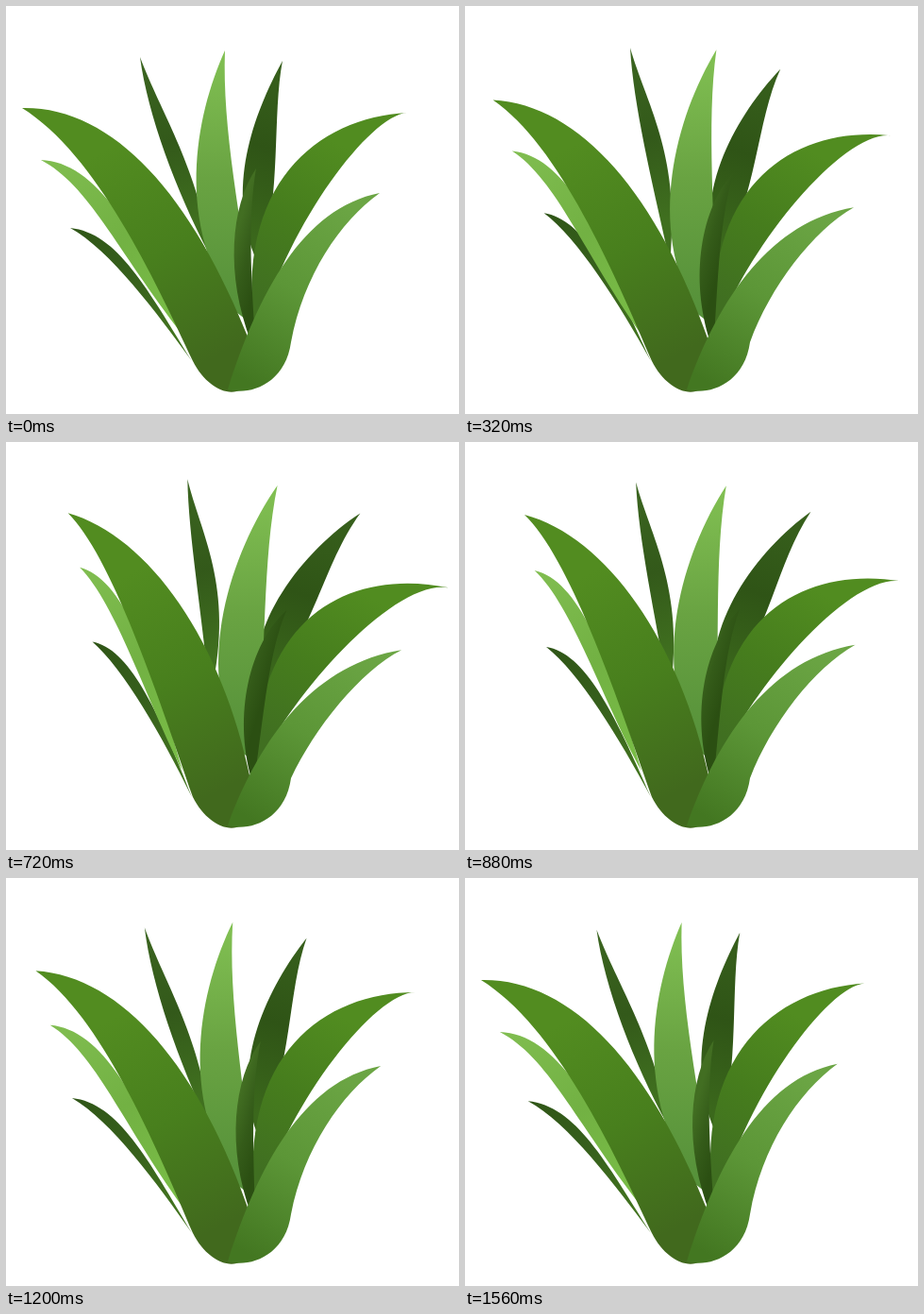
Write an HTML page with a canvas that moves like this. It is 480x432 px and loops after 1600 ms.

```html
<!DOCTYPE html>
<html lang="en">
<head>
<meta charset="utf-8">
<title>Swaying plant</title>
<style>
  html, body { margin: 0; height: 100%; overflow: hidden; background: #fff; }
  canvas { display: block; }
</style>
</head>
<body>
<canvas id="stage" width="480" height="432"></canvas>
<script>
const ctx = document.getElementById('stage').getContext('2d');
const LOOP = 1600, STEP = 40;

// A leaf has two edges running from the tip to fixed ends.
// Poses: tip, two controls of edge one, two controls of edge two.
// foot: optional controls of the curve joining both ends.
// shade: gradient line followed by its colours.
const leaves = [
  { // back left
    peak: 630, ends: [215, 262, 218, 262],
    rest: [142, 54, 150, 115, 180, 195, 165, 115, 198, 160],
    bent: [193, 39, 194, 100, 208, 180, 206, 95, 243, 153],
    shade: [170, 50, 210, 230, '#3b6520', '#33591a', '#40701f']
  },
  { // back right
    peak: 712, ends: [266, 270, 270, 270],
    rest: [293, 58, 262, 115, 232, 195, 282, 115, 292, 200],
    bent: [368, 74, 310, 115, 250, 195, 330, 130, 325, 200],
    shade: [320, 60, 265, 250, '#38611d', '#2f5416', '#3b681c']
  },
  { // low left
    peak: 625, ends: [197, 376, 197, 376],
    rest: [68, 235, 118, 240, 150, 300, 110, 258, 160, 325],
    bent: [92, 211, 130, 218, 160, 280, 125, 240, 165, 310],
    shade: [80, 220, 180, 350, '#2f5517', '#365f1c', '#42731f']
  },
  { // middle
    peak: 648, ends: [245, 325, 265, 340],
    rest: [232, 47, 200, 118, 179, 230, 229, 130, 248, 221],
    bent: [287, 46, 236, 120, 201, 235, 271, 125, 276, 220],
    shade: [250, 45, 250, 320, '#82c153', '#69a342', '#56913a']
  },
  { // large right
    peak: 665, ends: [264, 350, 269, 340],
    rest: [425, 113, 330, 118, 241, 189, 385, 116, 301, 229],
    bent: [468, 153, 368, 133, 262, 180, 412, 143, 307, 261],
    shade: [360, 150, 270, 310, '#518c20', '#467d1d', '#406f21']
  },
  { // inner dark
    peak: 648, ends: [260, 356, 264, 352],
    rest: [265, 172, 238, 212, 232, 285, 256, 225, 260, 290],
    bent: [297, 178, 257, 214, 241, 290, 278, 222, 273, 290],
    shade: [240, 255, 274, 265, '#426e22', '#345b19', '#2b4f12']
  },
  { // light left
    peak: 740, sharp: 1.5, ends: [187, 348, 187, 348],
    rest: [37, 163, 95, 165, 140, 240, 88, 190, 115, 255],
    bent: [71, 138, 118, 148, 150, 225, 112, 175, 143, 271],
    shade: [60, 150, 180, 340, '#80bd50', '#72b143', '#79bd46']
  },
  { // large left
    peak: 770, sharp: 1.5, bentAt: 880, ends: [259, 357, 198, 376],
    rest: [17, 108, 112, 106, 196, 197, 96, 157, 158, 290],
    bent: [63, 77, 150, 100, 228, 212, 110, 122, 158, 260],
    foot: [272, 425, 220, 420],
    shade: [110, 150, 225, 370, '#528c20', '#487f1d', '#41691d']
  },
  { // low right
    peak: 615, ends: [235, 406, 302, 356],
    rest: [396, 198, 314, 214, 267, 305, 354, 228, 315, 286],
    bent: [420, 221, 330, 235, 270, 310, 376, 243, 327, 304],
    foot: [258, 413, 296, 400],
    shade: [370, 215, 260, 400, '#6ba544', '#5c9637', '#437721']
  }
];

// Sway of a leaf: 0 in the rest pose, 1 in the bent pose.
function sway({ peak, sharp = 1, bentAt = 560 }, time) {
  const wave = t => ((1 + Math.cos((t - peak) / LOOP * 2 * Math.PI)) / 2) ** sharp;
  return (wave(time) - wave(0)) / (wave(bentAt) - wave(0));
}

function drawLeaf(leaf, time) {
  const w = sway(leaf, time);
  const p = leaf.rest.map((v, i) => v + (leaf.bent[i] - v) * w);
  const [ax, ay, bx, by] = leaf.ends;
  const [x1, y1, x2, y2, ...colors] = leaf.shade;
  const fill = ctx.createLinearGradient(x1, y1, x2, y2);
  colors.forEach((c, i) => fill.addColorStop(i / (colors.length - 1), c));

  ctx.beginPath();
  ctx.moveTo(p[0], p[1]);
  ctx.bezierCurveTo(p[2], p[3], p[4], p[5], ax, ay);
  if (leaf.foot) ctx.bezierCurveTo(...leaf.foot, bx, by);
  else ctx.lineTo(bx, by);
  ctx.bezierCurveTo(p[8], p[9], p[6], p[7], p[0], p[1]);
  ctx.fillStyle = fill;
  ctx.fill();
}

function frame() {
  const time = Math.floor(performance.now() % LOOP / STEP) * STEP;
  ctx.fillStyle = '#fff';
  ctx.fillRect(0, 0, 480, 432);
  for (const leaf of leaves) drawLeaf(leaf, time);
  requestAnimationFrame(frame);
}
frame();
</script>
</body>
</html>
```
